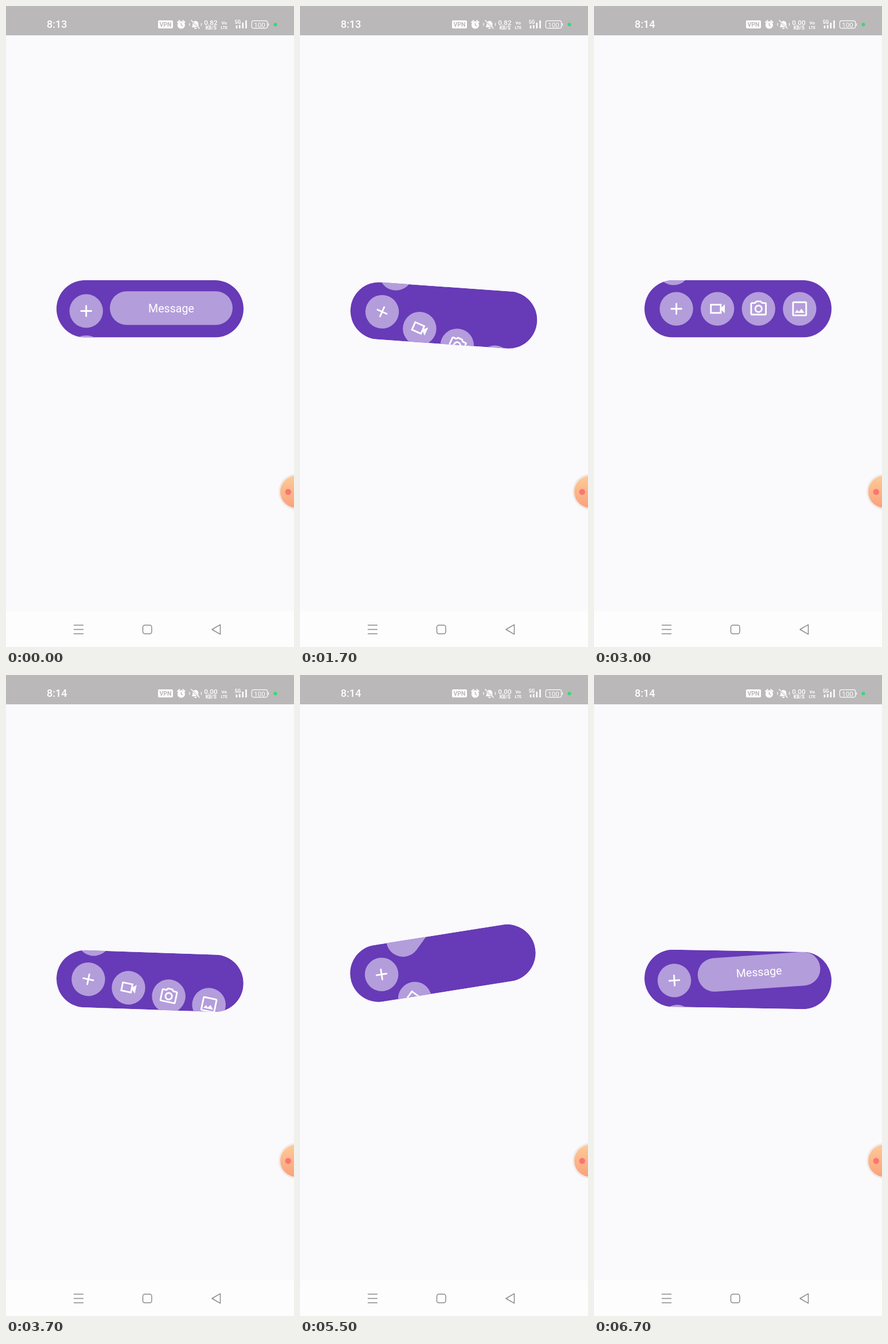
An HTML page that plays this animation: 502x1115 px, repeating every 6.8 s.

```html
<!DOCTYPE html>
<html lang="en">
<head>
<meta charset="utf-8">
<title>Tilting message bar</title>
<style>
html, body { margin: 0; width: 100%; height: 100%; overflow: hidden; background: #faf9fc; }
svg { display: block; width: 502px; height: 1115px; }
text { font-family: Roboto, sans-serif; fill: #fff; text-anchor: middle; }
.line { fill: none; stroke: #fff; stroke-width: 2; }
.nav { fill: none; stroke: #8b898c; stroke-width: 1.5; stroke-linejoin: round; }
.white { fill: #fff; }
.soft { fill: #b39ddb; }
</style>
</head>
<body>
<svg viewBox="0 0 502 1115">
  <defs>
    <clipPath id="bar"><rect x="88" y="477" width="326" height="99.5" rx="49.75"/></clipPath>
    <linearGradient id="peach" x1="0" y1="0" x2="0" y2="1">
      <stop offset="0" stop-color="#fdcb98"/>
      <stop offset="1" stop-color="#fba17b"/>
    </linearGradient>
  </defs>

  <rect width="502" height="1115" fill="#faf9fc"/>
  <rect width="502" height="51" fill="#bab8b9"/>
  <rect y="1053" width="502" height="62" fill="#fefdfe"/>

  <!-- status bar -->
  <text id="clock" x="88.7" y="38.3" font-size="18" font-weight="500">8:13</text>
  <rect class="white" x="265" y="25" width="26" height="14" rx="2"/>
  <text x="278" y="36" font-size="10.5" font-weight="700" style="fill:#bab8b9">VPN</text>
  <g>
    <circle class="white" cx="305.4" cy="33" r="6.6"/>
    <path d="M299 28.2l3.6-3M311.8 28.2l-3.6-3" stroke="#fff" stroke-width="2" stroke-linecap="round"/>
    <path d="M305.4 29.2v4l2.6 1.6" fill="none" stroke="#bab8b9" stroke-width="1.4"/>
  </g>
  <g>
    <path class="white" d="M323.5 37c1.7-1.5 1.8-3 1.8-6a5 5 0 0 1 10 0c0 3 .1 4.500 1.800 6zM328 38h4.600a2.300 2 0 0 1-4.600 0z"/>
    <path d="M323 25.500l14.500 14" stroke="#bab8b9" stroke-width="3"/>
    <path d="M322.500 24.500l15 15" stroke="#fff" stroke-width="1.400"/>
    <path d="M320 29.500v5M340.500 29.500v5" stroke="#fff" stroke-width="1.200"/>
  </g>
  <text id="rate" x="357" y="33" font-size="11.800" font-weight="500">0.82</text>
  <text x="357.300" y="41" font-size="8.500" font-weight="700">KB/S</text>
  <text x="380.300" y="32" font-size="8" font-weight="700">Vo</text>
  <text x="380.300" y="39.500" font-size="7" font-weight="700">LTE</text>
  <text x="404" y="31" font-size="8.500" font-weight="700">5G</text>
  <path d="M402 34v5M407.300 33v6M412.800 29v10M418.500 25v14" stroke="#fff" stroke-width="2.600"/>
  <rect x="428.300" y="25.700" width="27.400" height="13" rx="3.500" fill="none" stroke="#fff" stroke-width="1.200"/>
  <path d="M457.500 30v4.500" stroke="#fff" stroke-width="1.300"/>
  <text x="442" y="36.500" font-size="11.500">100</text>
  <circle cx="469.500" cy="32.300" r="3" fill="#35d975"/>

  <!-- message bar -->
  <g id="tilt">
    <g clip-path="url(#bar)">
      <rect x="88" y="477" width="326" height="99.500" fill="#673ab7"/>
      <g id="wheel">
        <g id="label">
          <rect class="soft" x="181" y="496.250" width="214" height="58.500" rx="29.250"/>
          <text x="288" y="532.500" font-size="19.600">Message</text>
        </g>
        <g id="icons"></g>
      </g>
    </g>
  </g>

  <!-- recorder button -->
  <circle cx="506" cy="845" r="31" fill="#f1e9e8"/>
  <circle cx="506" cy="845" r="28" fill="url(#peach)"/>
  <circle cx="491.800" cy="845.300" r="5.200" fill="#fa7672"/>

  <!-- navigation -->
  <g class="nav">
    <path d="M118 1077h17M118 1084.500h17M118 1092h17"/>
    <rect x="238.500" y="1077" width="15.500" height="15" rx="3.500"/>
    <path d="M359 1084.500l14.500-8.300v16.600z"/>
  </g>
</svg>
<script>
const LOOP = 6800, STEP = 100;
const HINGE = '88 526.75', HUB = { x: 139.8, y: 526.7 };
const FIRST = 3.8, GAP = 71.6, ICON_SCALE = 1.43;

// start, duration, direction
const swings = [
  [67, 300, 'open'], [1633, 300, 'close'],
  [2667, 300, 'open'], [3667, 300, 'close'],
  [5350, 300, 'open'], [6385, 333, 'close']
];

const icons = [
  '<path class="line" d="M5 12h14M12 5v14"/>',
  '<rect class="line" x="4" y="7" width="12" height="10"/><path class="white" d="M16.5 10.900l4.500-4.400v11l-4.500-4.400z"/>',
  '<path class="line" d="M4 5h3.600l1.800-2h5.200l1.800 2H20a1 1 0 0 1 1 1v12a1 1 0 0 1-1 1H4a1 1 0 0 1-1-1V6a1 1 0 0 1 1-1z"/><circle class="line" cx="12" cy="12" r="4"/>',
  '<rect class="line" x="4" y="4" width="16" height="16" rx="1"/><path class="white" d="M6 17l3-3.860 2.140 2.590 3-3.870L18 17z"/>'
];

const el = id => document.getElementById(id);
const rotate = (id, angle, about) => el(id).setAttribute('transform', `rotate(${angle} ${about})`);

el('icons').innerHTML = icons.map((shape, i) => `
  <g transform="translate(${HUB.x + FIRST + i * GAP} ${HUB.y})">
    <circle class="soft" r="29.200"/>
    <g id="icon${i}"><g transform="scale(${ICON_SCALE}) translate(-12 -12)">${shape}</g></g>
  </g>`).join('');

// turn: 90 shows the message, 0 shows the icons
function poseAt(t) {
  let pose = { turn: 90, tilt: 0, spin: 0 };
  for (const [start, length, kind] of swings) {
    if (t < start) break;
    const p = Math.min(1, (t - start) / length);
    const opening = kind === 'open';
    const turn = 90 * (opening ? 1 - p : p);
    const lean = Math.min(turn, 90 - turn) / 5;
    pose = { turn, tilt: opening ? -lean : lean, spin: opening ? -450 * p : 0 };
  }
  return pose;
}

function draw(now) {
  const t = Math.floor((now % LOOP) / STEP) * STEP;
  const { turn, tilt, spin } = poseAt(t);
  const hub = `${HUB.x} ${HUB.y}`;
  rotate('tilt', tilt, HINGE);
  rotate('wheel', turn, hub);
  rotate('label', -90, hub);
  rotate('icon0', spin, '0 0');
  el('clock').textContent = t < 3000 ? '8:13' : '8:14';
  el('rate').textContent = t < 2400 ? '0.82' : '0.00';
}

const origin = performance.now();
function tick() {
  draw(performance.now() - origin);
  requestAnimationFrame(tick);
}
tick();
</script>
</body>
</html>
```
